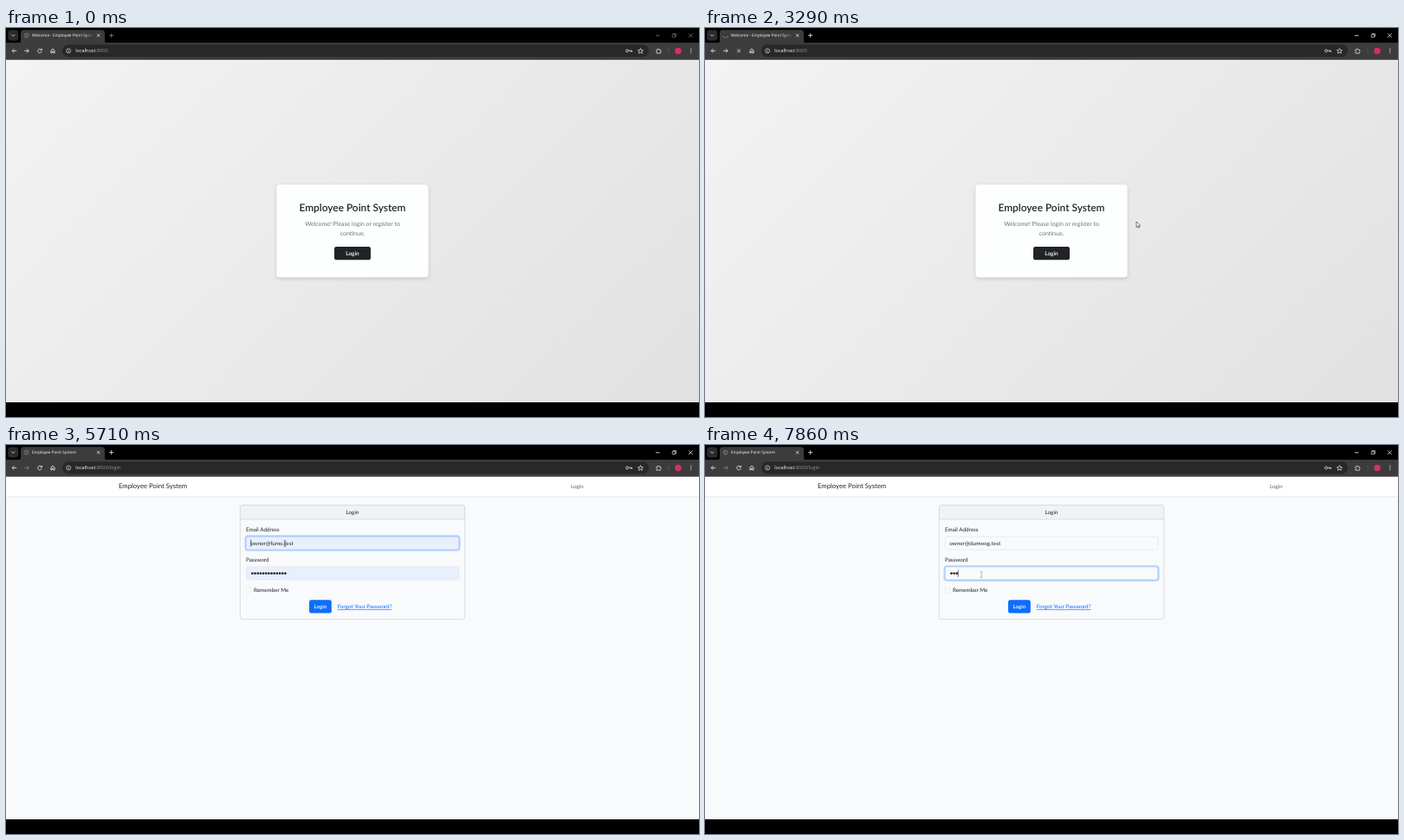
An HTML page for the animation above (8 s loop, 800 by 450 pixels).

```html
<!DOCTYPE html>
<html lang="en">
<head>
<meta charset="utf-8">
<title>Employee Point System</title>
<style>
  html, body { margin: 0; width: 100%; height: 100%; overflow: hidden; background: #000; }
  svg { display: block; }
  text { font-family: Lato, "Open Sans", sans-serif; font-size: 6.3px; fill: #212529; text-rendering: geometricPrecision; }
  .ui text { font-family: "Open Sans", "Noto Sans", sans-serif; font-size: 4.7px; fill: #fff; }
  .ui .url { font-size: 5.55px; }
  .mid { text-anchor: middle; }
  .semi { font-weight: 600; }
  .icon { fill: none; stroke: #dedede; stroke-width: .9; }
  .white { fill: #fff; }
  .field { stroke: #dee2e6; stroke-width: .6; }
  .focus .field { stroke: #86b7fe; }
  .ring { fill: none; stroke: #0d6efd; stroke-opacity: .27; stroke-width: 1.7; display: none; }
  .focus .ring { display: inline; }
</style>
</head>
<body>
<svg width="800" height="450" viewBox="0 0 800 450">
  <defs>
    <linearGradient id="page" gradientUnits="userSpaceOnUse" x1="100.75" y1="-64.25" x2="699.25" y2="534.25">
      <stop stop-color="#f3f3f4"/><stop offset="1" stop-color="#e1e1e1"/>
    </linearGradient>
    <linearGradient id="fade">
      <stop stop-color="#3c3c3c" stop-opacity="0"/><stop offset="1" stop-color="#3c3c3c"/>
    </linearGradient>
    <filter id="shadow" x="-20%" y="-20%" width="140%" height="150%">
      <feDropShadow dx="0" dy="1.7" stdDeviation="2.2" flood-opacity=".17"/>
    </filter>
    <filter id="thin" x="-5%" y="-20%" width="110%" height="160%">
      <feDropShadow dx="0" dy=".8" stdDeviation=".8" flood-opacity=".08"/>
    </filter>
  </defs>

  <g id="welcome">
    <rect y="36.5" width="800" height="396.5" fill="url(#page)"/>
    <rect x="312.5" y="181.3" width="175" height="107" rx="3.6" fill="#fdfefe" filter="url(#shadow)"/>
    <text class="mid semi" x="400" y="212" style="font-size:11.9px">Employee Point System</text>
    <g class="mid" style="--c:#6c757d">
      <text x="400" y="229" style="font-size:6.97px;fill:#6c757d">Welcome! Please login or register to</text>
      <text x="400" y="239.7" style="font-size:6.97px;fill:#6c757d">continue.</text>
    </g>
    <rect id="enter" x="379" y="253" width="42" height="15.3" rx="2.3"/>
    <text class="mid semi white" x="400" y="262.8" style="font-size:6.5px;fill:#fff">Login</text>
  </g>

  <g id="login">
    <rect y="36.5" width="800" height="396.5" fill="#f8fafc"/>
    <rect y="36.5" width="800" height="22.5" fill="#fff" filter="url(#thin)"/>
    <text x="130" y="50.2" style="font-size:7.72px">Employee Point System</text>
    <text x="652" y="50" style="fill:#666">Login</text>
    <path d="M270.3 86V72Q270.3 69.6 272.7 69.6H527.3Q529.7 69.6 529.7 72V86Z" fill="#f0f2f4"/>
    <path d="M270.3 86H529.7" stroke="#cdcfd1" stroke-width=".6"/>
    <rect x="270.3" y="69.6" width="259.4" height="132" rx="2.4" fill="none" stroke="#cdcfd1" stroke-width=".7"/>
    <text class="mid" x="400" y="80">Login</text>
    <text x="277" y="100">Email Address</text>
    <text x="277" y="135">Password</text>
    <g id="email">
      <rect class="ring" x="276.3" y="105.2" width="247.4" height="16.8" rx="3"/>
      <rect class="field" x="277.2" y="106.1" width="245.6" height="15" rx="2.3"/>
      <rect id="mark" x="282" y="108.8" width="50" height="9.6" fill="#1b62c9"/>
      <text id="address" x="282.3" y="115.8"></text>
    </g>
    <g id="password">
      <rect class="ring" x="276.3" y="140" width="247.4" height="16.8" rx="3"/>
      <rect class="field" x="277.2" y="140.9" width="245.6" height="15" rx="2.3"/>
      <g id="dots"></g>
    </g>
    <path id="caret" stroke="#111" stroke-width=".6"/>
    <rect x="277.3" y="165" width="5.6" height="5.6" rx="1.4" fill="#f8fafc" stroke="#dee2e6" stroke-width=".5"/>
    <text x="286" y="170">Remember Me</text>
    <rect x="350" y="179.3" width="25.8" height="15.2" rx="2.3" fill="#0d6efd"/>
    <text class="mid semi" x="363" y="189" style="font-size:6.2px;fill:#fff">Login</text>
    <text x="382.7" y="189" style="fill:#0d6efd;text-decoration:underline">Forgot Your Password?</text>
  </g>

  <g class="ui">
    <rect width="800" height="17.5"/>
    <rect x="2.3" y="2.4" width="12" height="12" rx="3.4" fill="#2b2b2b"/>
    <path class="icon" d="M6.4 7.6L8.3 9.5L10.2 7.6"/>
    <path d="M14 17.5Q17 17.5 17 14.5V6Q17 2.3 20.5 2.3H110.5Q114 2.3 114 6V14.5Q114 17.5 117 17.5Z" fill="#3c3c3c"/>
    <rect y="17" width="800" height="19.5" fill="#3c3c3c"/>
    <rect x="65" y="19.2" width="677" height="14.4" rx="7.2" fill="#282828"/>
    <g id="globe" fill="none" stroke="#8d8d8d" stroke-width=".6">
      <circle cx="23.6" cy="8.6" r="2.6"/><path d="M21.4 7.3L24 8.8L23.2 11M23.6 6L25.8 8.6"/>
    </g>
    <path id="spinner" fill="none" stroke="#5f8db8" stroke-width=".8"/>
    <svg x="30" y="2" width="70" height="14"><text id="tab" y="8.4"></text></svg>
    <rect x="92" y="3" width="8.5" height="12" fill="url(#fade)"/>
    <path class="icon" d="M105 6.9L108.4 10.3M108.4 6.9L105 10.3" stroke-width=".7"/>
    <g id="chrome" class="icon">
      <path d="M119.2 8.6H124.2M121.7 6.1V11.1M750 8.8H754.6"/>
      <path d="M769.2 7.6H772.4V10.6H769.2ZM770.2 7.4V6.6H773.5V9.8H772.6" stroke-width=".7"/>
      <path d="M788.2 6.4L792.6 10.8M792.6 6.4L788.2 10.8"/>
    </g>
    <path class="icon" d="M12.2 26.4H7.2M9.4 24.1L7.1 26.4L9.4 28.7"/>
    <path id="forward" class="icon" d="M21.2 26.4H26.2M24 24.1L26.3 26.4L24 28.7"/>
    <path id="reload" class="icon" d="M41 25.3A2.3 2.3 0 1 0 41.2 27.2M41.4 23.8V25.7H39.5"/>
    <path id="stop" class="icon" d="M37.2 24.6L40.8 28.2M40.8 24.6L37.2 28.2"/>
    <path class="icon" d="M51.9 25.9L54 24L56.1 25.9V28.9H54.8V27H53.2V28.9H51.9Z"/>
    <circle class="icon" cx="72.2" cy="26.4" r="2.5" style="stroke-width:.7"/>
    <path class="icon" d="M72.2 26V27.9M72.2 24.8V25.4" style="stroke-width:.7"/>
    <text class="url" x="80.2" y="28.3">localhost<tspan id="path" fill="#969696"></tspan></text>
    <g class="icon" style="stroke-width:.8">
      <circle cx="717" cy="26.4" r="1.5"/><path d="M718.5 26.2H722.6V28M721 26.2V27.8"/>
      <path d="M732.5 23.6L733.4 25.6L735.5 25.8L733.9 27.2L734.4 29.3L732.5 28.2L730.6 29.3L731.1 27.2L729.5 25.8L731.6 25.6Z"/>
      <path d="M750.9 25H752.3Q752.8 22.8 753.8 25H755.4V26.4Q757.6 27 755.4 28V29.2H750.9V28Q752.6 27.1 750.9 26.2Z"/>
    </g>
    <path d="M765 23.2V29.6" stroke="#646464" stroke-width=".6"/>
    <circle cx="776" cy="26.5" r="3.8" fill="#d52f68"/>
    <g fill="#e3e3e3"><circle cx="790.8" cy="24.2" r=".65"/><circle cx="790.8" cy="26.4" r=".65"/><circle cx="790.8" cy="28.6" r=".65"/></g>
  </g>

  <g id="pointer" stroke-linejoin="round">
    <path id="arrow" d="M0 0V6.6L1.5 5.2L2.5 7.4L3.5 6.9L2.5 4.8H4.7Z" fill="#fff" stroke="#222" stroke-width=".6"/>
    <path id="hand" d="M-.7 .6Q0 -.5 .7 .6V3.2L3.4 3.9Q4.4 4.3 4.2 5.4L3.5 8.8H0L-2.3 5.6Q-2 4.6 -.7 5.6Z" fill="#fff" stroke="#222" stroke-width=".6"/>
    <path id="beam" d="M-1.3 -3.3H-.4L0 -2.9L.4 -3.3H1.3M0 -2.9V2.9M-1.3 3.3H-.4L0 2.9L.4 3.3H1.3" fill="none" stroke="#333" stroke-width=".65"/>
  </g>
</svg>

<script>
const $ = id => document.getElementById(id);
const show = (id, on) => $(id).style.display = on ? "" : "none";
const TICK = 1000 / 7, LOOP = 8000;
const SAVED = "owner@fumo.test", TYPED = "owner@dumwog.test";

// pointer stops: [tick, x, y]
const route = [
  [4, 452, 240], [6, 407, 262], [11, 407, 262], [15, 498, 224], [37, 498, 224],
  [40, 322, 114], [42, 322, 114], [44, 301, 145], [47, 301, 145], [49, 319, 150]
];

function along(k) {
  const i = route.findIndex(p => p[0] > k);
  if (i < 0) return route.at(-1).slice(1);
  if (i === 0) return route[0].slice(1);
  const [a, x, y] = route[i - 1], [b, u, v] = route[i], f = (k - a) / (b - a);
  return [x + (u - x) * f, y + (v - y) * f];
}

function spin(k) {
  const mid = Math.PI / 2 - (k - 23) * Math.PI / 4.5;
  const half = .12 + 1.8 * Math.sin(Math.PI * (k - 8) / 9) ** 2;
  const at = a => `${23.6 + 2.7 * Math.cos(a)} ${8.6 + 2.7 * Math.sin(a)}`;
  $("spinner").setAttribute("d", `M${at(mid - half)}A2.7 2.7 0 ${half > Math.PI / 2 ? 1 : 0} 1 ${at(mid + half)}`);
}

function drawDots(n, step, r) {
  $("dots").innerHTML = Array.from({ length: n }, (_, i) =>
    `<circle cx="${282.8 + step * (i + .5)}" cy="148.6" r="${r}"/>`).join("");
}

function drawForm(k) {
  const preview = k < 40, selected = k >= 42 && k < 45, onPassword = k >= 49;
  const typed = k < 45 ? 0 : Math.min(TYPED.length, (k - 44) * 4 + 1);
  const address = $("address");
  address.textContent = typed ? TYPED.slice(0, typed) : SAVED;
  address.style.fontSize = preview ? "6px" : "6.3px";
  address.style.fontWeight = preview ? 600 : 400;
  address.style.fill = selected ? "#fff" : "";
  show("mark", selected);
  $("email").setAttribute("class", onPassword ? "" : "focus");
  $("password").setAttribute("class", onPassword ? "focus" : "");
  $("email").setAttribute("fill", typed ? "#f8fafc" : "#e8f0fe");
  $("password").setAttribute("fill", k >= 50 ? "#f8fafc" : "#e8f0fe");
  $("dots").setAttribute("fill", "#111");

  const count = k < 50 ? 13 : k < 53 ? 0 : k < 55 ? 1 : 3;
  drawDots(count, preview ? 1.95 : 3.17, preview ? .7 : 1.25);

  const x = onPassword ? 282.7 + 3.17 * count : typed ? 282.7 + address.getComputedTextLength() : 282.7;
  $("caret").setAttribute("d", onPassword ? `M${x} 144.6V152.6` : `M${x} 109.4V117.6`);
  show("caret", !selected && k !== 49 && k !== 52);
}

function draw(t) {
  const k = Math.floor((t + 5) / TICK);
  const second = k >= 36, active = k >= 7, loading = active && !second;
  show("welcome", !second);
  show("login", second);
  show("globe", !loading);
  show("spinner", loading);
  show("reload", !loading);
  show("stop", loading);
  $("chrome").style.opacity = active ? 1 : .5;
  $("forward").style.opacity = second ? .4 : 1;
  $("tab").textContent = (second ? "" : "Welcome - ") + "Employee Point System";
  $("path").textContent = second ? ":8000/login" : ":8000";
  $("path").style.fill = "#969696";
  $("enter").setAttribute("fill", k >= 6 && k < 12 ? "#484c51" : "#212327");
  if (loading) spin(k);
  if (second) drawForm(k);

  const [x, y] = along(k);
  $("pointer").setAttribute("transform", `translate(${x} ${y})`);
  const hand = k >= 6 && k < 12, beam = k >= 40;
  show("pointer", k >= 4);
  show("hand", hand);
  show("beam", beam);
  show("arrow", !hand && !beam);
  $("beam").style.opacity = k >= 49 ? .55 : 1;
}

const start = performance.now();
function loop() {
  draw((performance.now() - start) % LOOP);
  requestAnimationFrame(loop);
}
loop();
</script>
</body>
</html>
```
